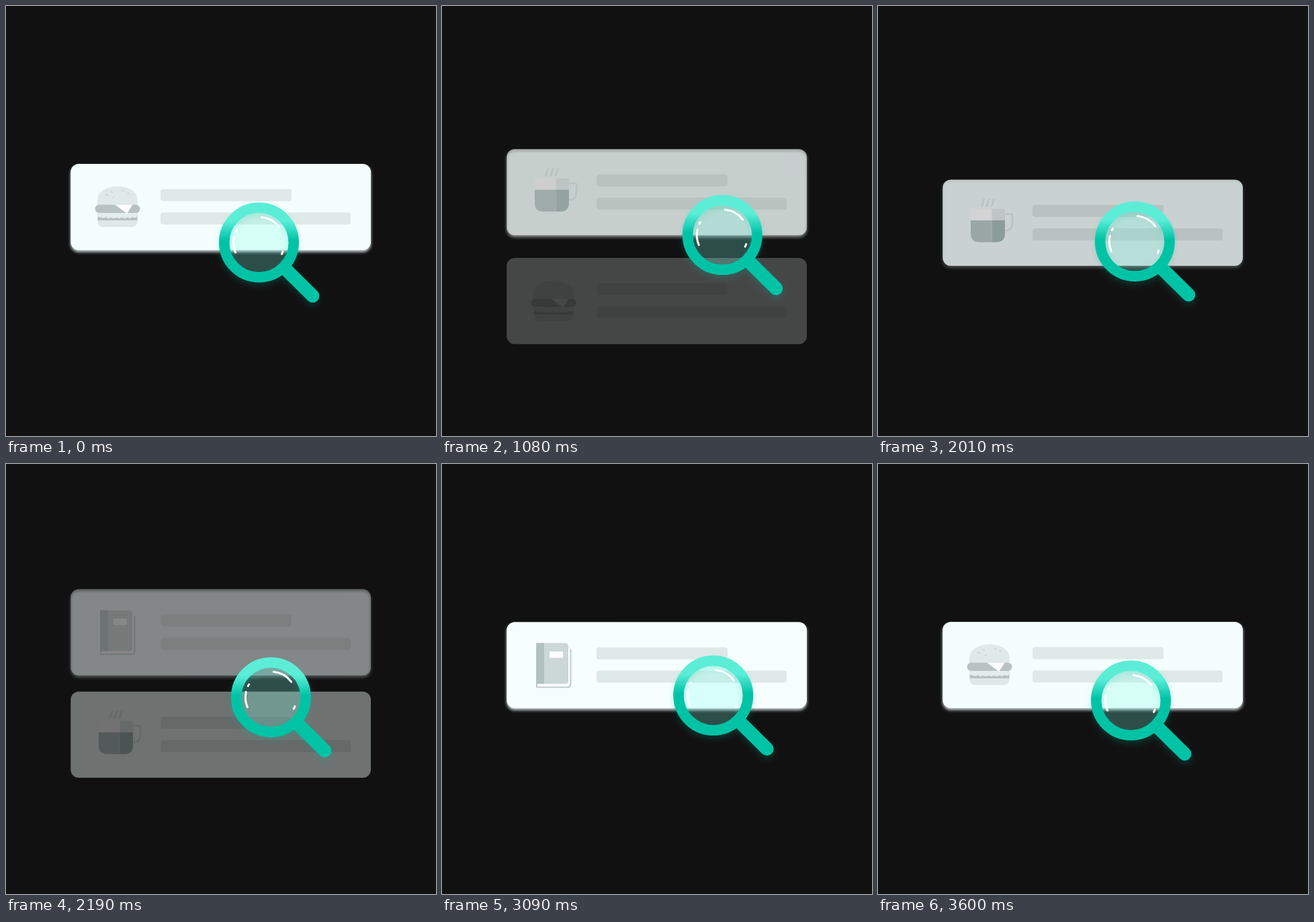
These frames come from a looping animation (640 px wide and 640 px high, 3.69 s). An HTML page:

```html
<!DOCTYPE html>
<html lang="en">
<head>
<meta charset="utf-8">
<title>Search cards</title>
<style>
  html, body { margin: 0; width: 100%; height: 100%; overflow: hidden; background: #111; }
  svg { display: block; width: 100vw; height: 100vh; }
  .pale { fill: #dfe9e7; }
  .mid { fill: #b8c3c1; }
  .line { fill: none; stroke: #dfe9e7; stroke-width: 2.5; stroke-linecap: round; }
</style>
</head>
<body>
<svg viewBox="0 0 640 640">
  <defs>
    <filter id="soft" x="-5%" y="-15%" width="110%" height="130%">
      <feGaussianBlur stdDeviation="2"/>
    </filter>
    <filter id="drop" filterUnits="userSpaceOnUse" x="-90" y="-90" width="210" height="210">
      <feDropShadow dx="0" dy="5" stdDeviation="5" flood-color="#00b79c" flood-opacity=".2"/>
    </filter>
    <linearGradient id="rim" gradientUnits="userSpaceOnUse" x1="0" y1="-32" x2="0" y2="-3">
      <stop offset="0" stop-color="#5bedd7"/>
      <stop offset="1" stop-color="#00c3a6"/>
    </linearGradient>
    <rect id="plate" x="96.3" y="235" width="446.7" height="128.3" rx="12"/>
    <g id="bars" class="pale">
      <rect x="230" y="272.5" width="195" height="18" rx="4"/>
      <rect x="230" y="307.3" width="283" height="18" rx="4"/>
    </g>
  </defs>

  <g class="card">
    <use href="#plate" class="glow" fill="#f4fdfc" filter="url(#soft)"/>
    <g class="face">
      <use href="#plate" fill="#f4fefc"/>
      <use href="#bars"/>
      <path class="pale" d="M136 297V290C136 276 150 268.5 166 268.5S196 276 196 290V297Z"/>
      <path d="M149 280.5l2 1M156.5 276l1.5 1.5M159.5 285l1.5-1M174 274.5l1.5 1M181.5 278l1 1.5"
        stroke="#c6d2d0" stroke-width="1.5" stroke-linecap="round"/>
      <rect class="mid" x="136.5" y="308" width="59" height="12"/>
      <path fill="#e3edeb" d="M136.5 307.5H195.5V313q-3.5 4-7 1q-4 3-8 .5q-4 3-8 0q-4 3-8 0q-4 3-8 0q-4 3-8-.5q-4 3-8 0q-3 1-4-1Z"/>
      <rect class="mid" x="132.5" y="295.7" width="67" height="12.4" rx="6.2"/>
      <path fill="#fff" d="M162.5 295.7H188.5L180 309Z"/>
      <path class="pale" d="M136.5 319H195.5V320Q195.5 329 186.5 329H145.5Q136.5 329 136.5 320Z"/>
    </g>
  </g>

  <g class="card">
    <use href="#plate" class="glow" fill="#f4fdfc" filter="url(#soft)"/>
    <g class="face">
      <use href="#plate" fill="#f4fefc"/>
      <use href="#bars"/>
      <path class="line" d="M154.3 274.5c3-5 .5-5.500 3.500-10M161.600 274.500c3-5 .5-5.500 3.500-10M169 274.500c3-5 .5-5.500 3.500-10"/>
      <path class="line" d="M189 286H198Q200 286 200 288V299Q200 310.500 189 311"/>
      <path fill="#fff" d="M138 278.500H169.500V296H138Z"/>
      <path fill="#e5eceb" d="M169.500 278.500H189V296H169.500Z"/>
      <path fill="#b5c5c2" d="M138 295.500H169.500V328H151Q138 328 138 315Z"/>
      <path fill="#a2b6b2" d="M169.500 295.500H189V315Q189 328 176 328H169.500Z"/>
    </g>
  </g>

  <g class="card">
    <use href="#plate" class="glow" fill="#f4fdfc" filter="url(#soft)"/>
    <g class="face">
      <use href="#plate" fill="#f7fefe"/>
      <use href="#bars"/>
      <path fill="#c0cdca" d="M140 268H186L192.500 276V328Q192.500 333 187.500 333H140Z"/>
      <path fill="#fff" d="M142 268H186L190.500 274V327Q190.500 331 186.500 331H142Z"/>
      <path fill="#cbd8d5" d="M140.300 266.300H183Q188 266.300 188 271.300V323Q188 327 184 327H140.300Z"/>
      <path fill="#b3c1be" d="M140.300 266.300H152V327H140.300Z"/>
      <rect fill="#fff" x="160" y="279" width="20" height="9.300"/>
    </g>
  </g>

  <g id="lens">
    <g filter="url(#drop)" fill="none">
      <path d="M39 39L80 79.500" stroke="#00c3a6" stroke-width="20" stroke-linecap="round"/>
      <circle r="51.700" stroke="url(#rim)" stroke-width="15.600"/>
    </g>
    <circle r="44" fill="#7dffec" fill-opacity=".25"/>
    <path id="shine" fill="none" stroke="#fff" stroke-width="3" stroke-linecap="round"/>
  </g>
</svg>
<script>
  const LOOP = 3690, END = 3600, STEP = 30, SLOT = 1200, SWING = 1800;
  const cards = [...document.querySelectorAll('.card')].map(el => ({
    el, glow: el.querySelector('.glow'), face: el.querySelector('.face')
  }));
  const lens = document.getElementById('lens');

  const span = (t, a, b) => Math.min(1, Math.max(0, (t - a) / (b - a)));
  const ease = p => (1 - Math.cos(Math.PI * p)) / 2;

  const polar = deg => {
    const a = deg * Math.PI / 180;
    return `${38 * Math.cos(a)} ${38 * Math.sin(a)}`;
  };
  const arc = ([a, b]) => `M${polar(a)}A38 38 0 0 1 ${polar(b)}`;
  document.getElementById('shine').setAttribute('d',
    [[-84, -37], [157, 192], [206, 210], [21, 27]].map(arc).join(''));

  function pose(card, y, alpha, glow) {
    card.el.setAttribute('transform', `translate(0 ${y})`);
    card.el.style.display = alpha > 0 ? '' : 'none';
    card.face.setAttribute('opacity', alpha);
    card.glow.setAttribute('opacity', glow * 0.8);
    card.glow.setAttribute('y', 3);
  }

  function draw(ms) {
    const t = Math.min(END, Math.floor((ms % LOOP) / STEP) * STEP);
    const slot = Math.floor(t / SLOT), ph = t % SLOT;
    const rise = span(ph, 890, 1200);
    cards.forEach((card, i) => {
      const turn = (i - slot % 3 + 3) % 3;
      if (turn === 0) {
        pose(card, 160 * ease(span(ph, 680, 1200)), 1 - span(ph, 690, 1195), 1 - span(ph, 690, 860));
      } else if (turn === 1) {
        pose(card, -60 * (1 - ease(span(ph, 904, 1204))), rise, rise);
      } else {
        pose(card, 0, 0, 0);
      }
    });
    const s = ease(2 * t / SWING);
    lens.setAttribute('transform', `translate(${376.5 + 45.1 * s} ${352 - 12.3 * s})`);
  }

  const start = performance.now();
  function tick() {
    draw(performance.now() - start);
    requestAnimationFrame(tick);
  }
  tick();
</script>
</body>
</html>
```
